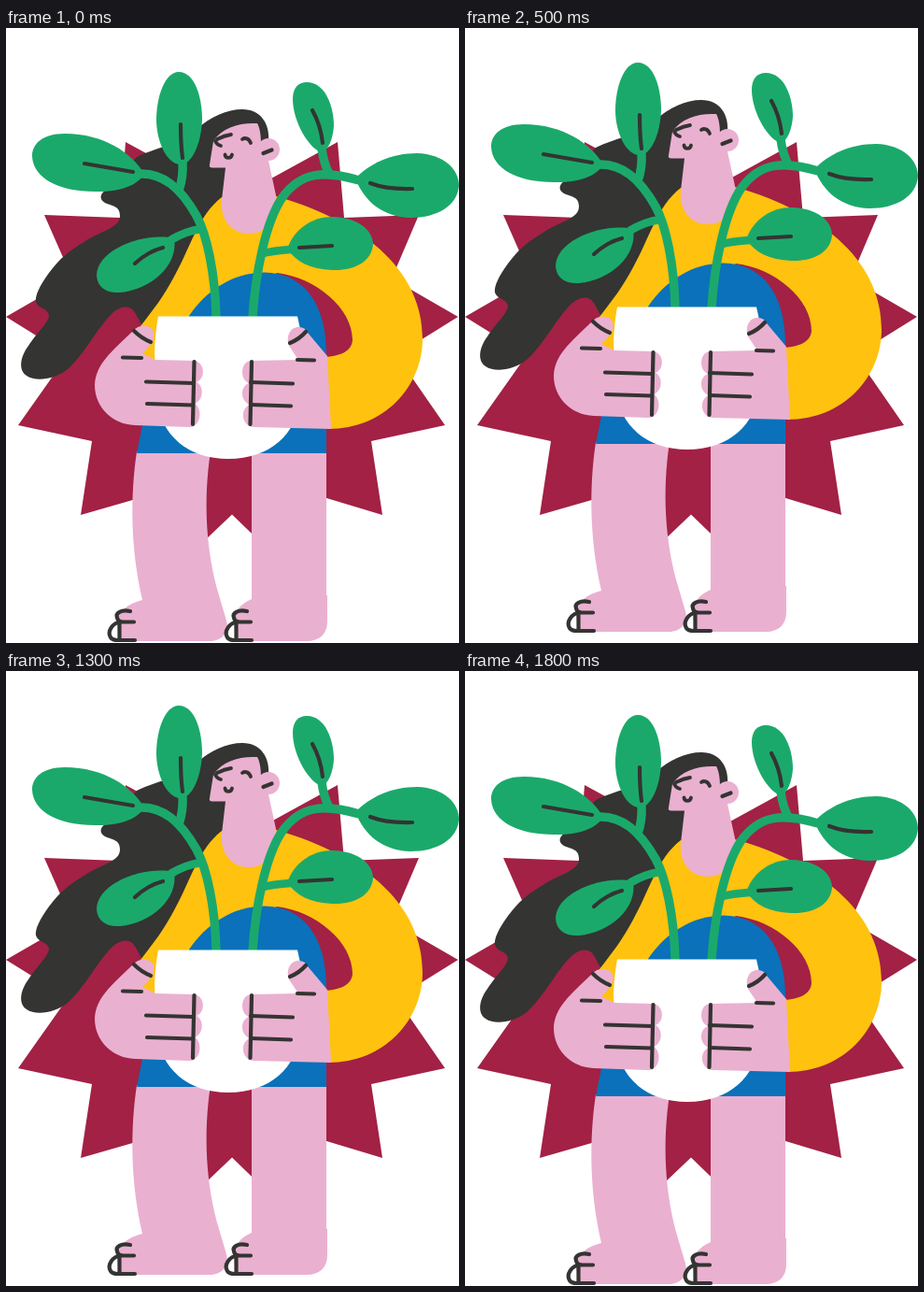
An HTML page with a canvas for the animation above (1900 ms loop, 485 by 658 pixels).

```html
<!DOCTYPE html>
<html lang="en">
<head>
<meta charset="utf-8">
<title>Plant carrier</title>
<style>
  html, body { margin: 0; width: 100%; height: 100%; overflow: hidden; background: #fff; }
  canvas { display: block; width: 485px; height: 658px; }
</style>
</head>
<body>
<canvas id="stage" width="485" height="658"></canvas>
<script>
const ctx = document.getElementById('stage').getContext('2d');
const PINK = '#eab0d0', INK = '#343432', GREEN = '#1ba96b', YELLOW = '#ffc20f',
      BLUE = '#0a71ba', WINE = '#a22145', WHITE = '#fff';

const STEP = 100, STEPS = 19, RISE = 2;

const fillShape = (color, d) => ({ color, path: new Path2D(d) });
const line = (color, width, d, cap = 'round') => ({ color, width, cap, path: new Path2D(d) });
const ink = (d, width = 4.2) => line(INK, width, d);

const burst = fillShape(WINE, `M128 122 L242 184 L355 122 L362 203 L442 200 L413 268
  L484 309 L418 350 L470 425 L391 442 L403 521 L330 499 L291 568 L242 520.5 L192 568
  L153 500 L80 521 L92 442 L13 425 L66 350 L0 309 L71 268 L41 200 L122 203 Z`);

const hair = fillShape(INK, `M281 122 C283 103 273 87 253 87 C237 87 218 95 205 108
  C185 125 160 128 140 138 L112 170 C100 176 99 183 106 187 C114 191 122 190 122 201
  C122 214 102 217 85 228 C67 239 58 246 46 262 C36 276 31 286 32 293 C34 300 45 300 46 307
  C46 315 33 326 24 340 C15 352 13 366 22 372 C32 379 52 376 66 365
  C85 348 98 320 115 304 C127 295 135 298 139 306 L146 319 L200 300 L240 190 V150 H281 Z`);

const legs = [
  fillShape(PINK, `M140 453 C133 500 133 556 146 612 C130 616 120 624 119 638 L121 656 H218
    C232 656 239 646 236 634 L228 607 C214 560 211 505 219 453 Z`),
  fillShape(PINK, `M263 453 H343 V607 H344 V635 C344 648 336 656 322 656 H246 L244 638
    C244 624 250 617 263 611 Z`)
];

const toes = [0, 125].flatMap(dx => [
  ink(`M${133 + dx} 624 C${123 + dx} 622 ${117 + dx} 626 ${119 + dx} 631 Q${120 + dx} 635 ${123 + dx} 635`),
  ink(`M${137 + dx} 635.5 H${123 + dx} C${114 + dx} 636 ${108 + dx} 646 ${112 + dx} 652 Q${114 + dx} 655 ${120 + dx} 655 H${138 + dx}`),
  ink(`M${121.5 + dx} 636 V655`)
]);

const clothes = [
  fillShape(YELLOW, `M231 181 C206 200 197 236 180 266 C169 287 158 301 144 319 L146 360 H200
    L240 300 L290 262 C332 267 371 300 371 334 C370 346 358 351 341 352 L345 429
    C405 429 446 384 446 332 C446 264 390 209 289 180 Z`),
  fillShape(BLUE, `M140 455 L148 415 L196 308 C214 281 243 261.5 277 261.5
    C315 262 343 290 343 350 V455 Z`)
];

const head = [
  fillShape(PINK, `M222 121 C232 106 250 101 269 102 C272 107 273 116 273 123 L281 142 L289 179
    C292 202 280 220 260 220 C241 220 229 204 231 184 L235 149.5 H221 Q217 149.5 218 146 Z`),
  fillShape(PINK, 'M269 130 a12 12 0 1 0 24 0 a12 12 0 1 0 -24 0 Z'),
  ink('M226 119 Q234 115 241 114', 3.8),
  ink('M224 121 Q226 125 230 126', 3.8),
  ink('M253 119 C256 117 260 118 262 123', 3.8),
  ink('M234.5 135.5 C235 140 241 140 242 135.5', 3.8),
  ink('M275.5 134 L284.5 130.5')
];

const stem = (d, width = 9.4) => line(GREEN, width, d, 'butt');
const plant = [
  stem('M225 310 C224 262 215 221 204 201 C187 171 168 155 143 156'),
  stem('M264 310 C267 262 278 207 296 181 C316 154 340 152 378 163'),
  stem('M209 215 Q193 217 176 227', 8.6),
  stem('M272 242 Q286 238 305 237', 8.6),
  stem('M185 174 Q190 160 189 143'),
  stem('M347 158 Q340 145 338 129'),
  fillShape(GREEN, `M148 156 C135 134 105 113 63 113 C39 113 28 124 28 137
    C29 161 57 175 95 175 C120 176 141 169 148 156 Z`),
  fillShape(GREEN, `M185 47 C202 47 210 74 210 98 C209 124 199 146 187 146
    C172 146 161 121 161 98 C161 74 170 47 185 47 Z`),
  fillShape(GREEN, `M322 58 C342 58 351 84 351 105 C350 119 345 130 339 133
    C326 132 307 101 307 76 C307 64 313 58 322 58 Z`),
  fillShape(GREEN, `M374 161 C389 145 413 134 440 134 C470 135 485 152 485 169
    C483 190 462 203 433 203 C403 202 384 186 374 161 Z`),
  fillShape(GREEN, `M301 236 C309 215 327 202 350 202 C377 203 393 216 393 232
    C391 250 373 260 349 259 C326 258 310 250 301 236 Z`),
  fillShape(GREEN, `M180 225 C148 218 97 237 97 265 C98 278 108 284 122 283
    C155 280 185 254 180 225 Z`),
  ink('M84 145 L136 154'),
  ink('M187 103 Q187 124 189 139'),
  ink('M328 88 Q337 104 339 123'),
  ink('M390 166 Q408 173 435 172'),
  ink('M314 235 L349 233'),
  ink('M138 252 Q152 239 168 235')
];

const pot = fillShape(WHITE, `M163 308.5 H312 L315 322 V395 C312 435 282 461 238 461
  C195 461 165 436 161 395 L159 345 Q160 324 163 308.5 Z`);

const hands = [
  fillShape(PINK, `M136 324 C142 317 155 317 158 325 C160 335 154 340 146 348 L160 355 L202 356
    C213 358 214 375 204 379 C212 383 212 398 202 402 C211 407 209 427 196 427
    L138 425 C113 424 95 405 95 382 C96 360 112 347 136 324 Z`),
  fillShape(PINK, `M262 356 L313 355 L303 340 C299 328 306 319 314 320 Q320 320 323 326
    L344 351 L348 429 L266 427 C252 427 250 407 261 403
    C251 399 250 384 260 380 C250 376 251 357 262 356 Z`),
  ink('M137 324 Q145 332 155 336'),
  ink('M125 352.5 L145 353'),
  ink('M201.5 357 L200 424'),
  ink('M150 378.5 L201 380'),
  ink('M151 402 L200 403.5'),
  ink('M304 337 Q314 333 321 325'),
  ink('M312 355 L330 355.5'),
  ink('M263 357 L261.5 424'),
  ink('M262 379 L307 380.5'),
  ink('M262 403 L305 404.5')
];

const figure = [hair, ...legs, ...toes, ...clothes, ...head, ...plant, pot, ...hands];

function paint({ color, width, cap, path }) {
  if (width) {
    ctx.strokeStyle = color;
    ctx.lineWidth = width;
    ctx.lineCap = cap;
    ctx.lineJoin = 'round';
    ctx.stroke(path);
  } else {
    ctx.fillStyle = color;
    ctx.fill(path);
  }
}

// The figure rises and sinks evenly in hard steps; the burst stays put.
function draw(time) {
  const step = Math.floor(time / STEP) % STEPS;
  const half = (STEPS - 1) / 2;
  const lift = RISE * (half - Math.abs(step - half));
  ctx.fillStyle = WHITE;
  ctx.fillRect(0, 0, 485, 658);
  paint(burst);
  ctx.save();
  ctx.translate(0, -lift);
  figure.forEach(paint);
  ctx.restore();
}

const start = performance.now();
function tick() {
  draw(performance.now() - start);
  requestAnimationFrame(tick);
}
tick();
</script>
</body>
</html>
```
